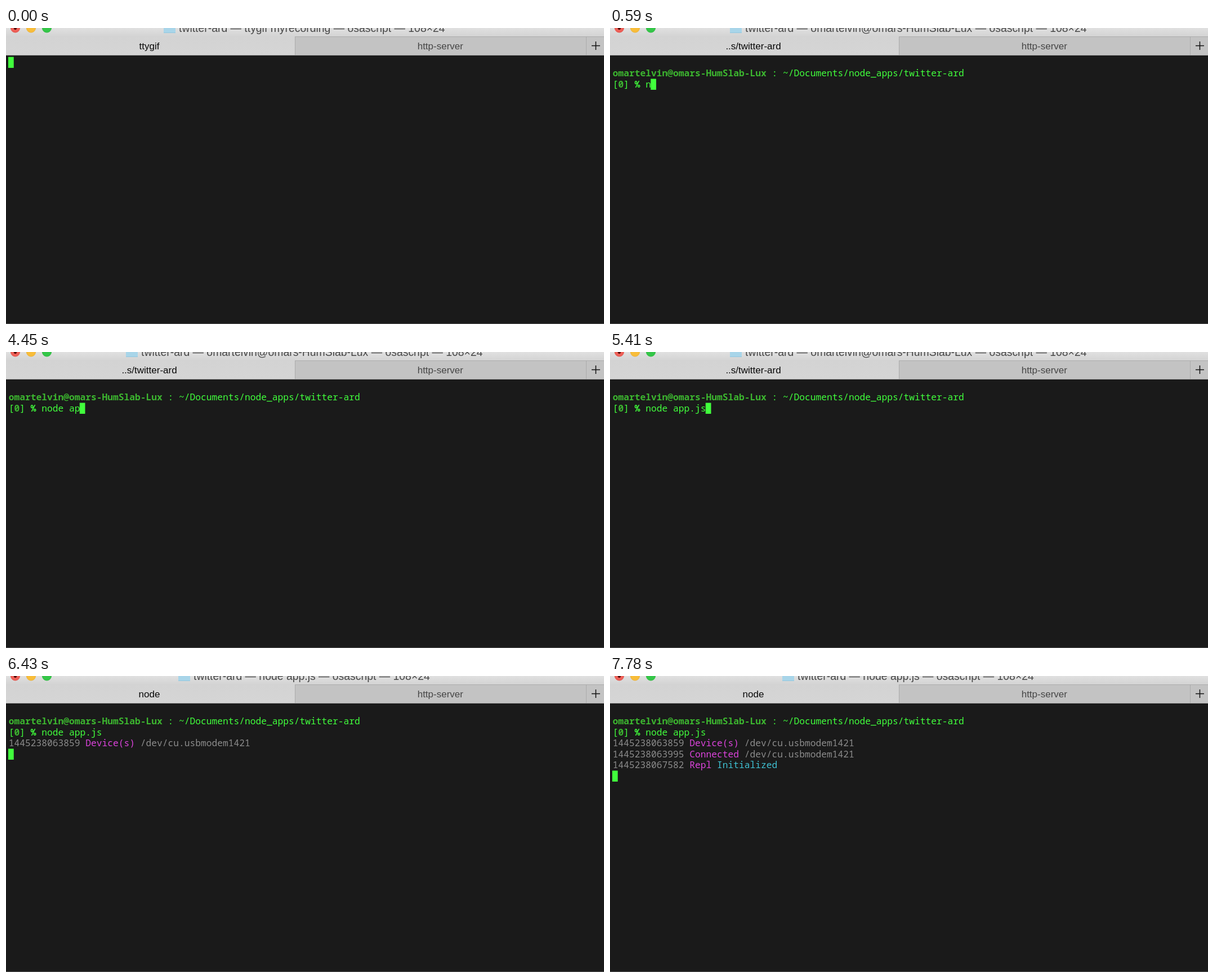
Animation of 1062 by 527 pixels, one loop 8000 ms. Source, as an HTML page with a canvas:

```html
<!DOCTYPE html>
<html lang="en">
<head>
<meta charset="utf-8">
<title>Terminal session</title>
<style>
  html, body { margin: 0; width: 100%; height: 100%; overflow: hidden; background: #1a1a1a; }
  canvas { display: block; }
</style>
</head>
<body>
<canvas id="stage" width="1062" height="527"></canvas>
<script>
const ctx = document.getElementById('stage').getContext('2d');
const LOOP = 8000, CELL = 9.75, ROW = 19.5, LEFT = 4, TOP = 51.5;
const MONO = '16.25px "Noto Sans Mono", monospace';
const SANS = '"Liberation Sans", Arial, sans-serif';
const GREEN = '#41ff3c', DARK = '#3cb52f', GRAY = '#8b8b8b', PINK = '#dc43dc', CYAN = '#3fc0d2';

const host = 'omartelvin@omars-HumSlab-Lux';
const command = 'node app.js';
const keyTimes = [590, 3480, 3710, 3890, 3980, 4070, 4450, 4620, 4760, 5090, 5410];

// A run is [text, colour, bold].
const pathLine = [[host, DARK, true], [' : ~/Documents/node_apps/twitter-ard', GREEN]];
const promptLine = [['[', GREEN], ['0', DARK, true], ['] ', GREEN], ['%', GREEN, true], [' ', GREEN]];
const log = (stamp, label, rest, colour) => [[stamp + ' ', GRAY], [label + ' ', PINK], [rest, colour]];
const port = '/dev/cu.usbmodem1421';

// The last line always carries the cursor.
function screenLines(t) {
  if (t < 270) return [[]];
  if (t < 370) return [[], []];
  if (t < 480) return [[], pathLine, []];
  const typed = command.slice(0, keyTimes.filter(k => k <= t).length);
  const lines = [[], pathLine, [...promptLine, [typed, GREEN]]];
  if (t >= 6330) lines.push(log('1445238063859', 'Device(s)', port, GRAY));
  if (t >= 7650) lines.push(log('1445238063995', 'Connected', port, GRAY));
  if (t >= 7780) lines.push(log('1445238067582', 'Repl', 'Initialized', CYAN));
  if (t >= 6130 && !(t >= 6330 && t < 6430)) lines.push([]);
  return lines;
}

function windowState(t) {
  if (t < 270) return ['ttygif', 'ttygif myrecording'];
  if (t < 6230) return ['..s/twitter-ard', host];
  return ['node', command];
}

function rect(x, y, w, h, colour) {
  ctx.fillStyle = colour;
  ctx.fillRect(x, y, w, h);
}

function text(str, x, y, font, colour, align = 'left') {
  ctx.font = font;
  ctx.fillStyle = colour;
  ctx.textAlign = align;
  ctx.fillText(str, x, y);
}

function disc(x, y, r, fill, edge = fill) {
  ctx.beginPath();
  ctx.arc(x, y, r, 0, Math.PI * 2);
  ctx.fillStyle = fill;
  ctx.fill();
  ctx.strokeStyle = edge;
  ctx.lineWidth = 1;
  ctx.stroke();
}

const barFill = ctx.createLinearGradient(0, 0, 0, 48);
barFill.addColorStop(0, '#e0e0e0');
barFill.addColorStop(0.32, '#d3d3d3');
barFill.addColorStop(1, '#d5d5d5');

function drawWindow([tab, process]) {
  rect(0, 0, 1062, 48, barFill);
  disc(16.5, 0, 8, '#ee5f57', '#e2554d');
  disc(16.5, 0.5, 2.2, '#4d0a08');
  disc(44.5, 0, 8, '#f8bd3a', '#ecb135');
  disc(72.5, 0, 8, '#34c648', '#30ba42');

  // Folder and title are centred together.
  const title = `twitter-ard — ${process} — osascript — 108×24`;
  const font = '19.4px ' + SANS;
  ctx.font = font;
  const x = Math.round(529.5 - (ctx.measureText(title).width + 27) / 2);
  rect(x, 0, 21, 9, '#a8d5e9');
  rect(x, 8, 21, 1, '#94c6dd');
  text(title, x + 27, 7, font, '#484848');

  rect(513, 15, 549, 33, '#c3c3c3');
  rect(513, 15, 549, 1, '#acacac');
  rect(513, 15, 1, 33, '#acacac');
  rect(1030, 15, 1, 33, '#acacac');
  rect(0, 48, 1062, 1, '#9b9b9b');
  text(tab, 254.5, 38, '17px ' + SANS, '#080808', 'center');
  text('http-server', 771.3, 38, '17px ' + SANS, '#464646', 'center');
  rect(1040, 30.8, 15, 1.5, '#111');
  rect(1046.7, 24, 1.5, 15, '#111');
}

function drawScreen(lines) {
  rect(0, 49, 1062, 478, '#1a1a1a');
  rect(0, 526, 1062, 1, '#4c4c4c');
  lines.forEach((runs, row) => {
    const y = TOP + row * ROW;
    let x = LEFT;
    for (const [str, colour, bold] of runs) {
      text(str, x + 0.7, Math.round(y + 15), (bold ? 'bold ' : '500 ') + MONO, colour);
      x += str.length * CELL;
    }
    if (row === lines.length - 1) rect(x, y, CELL, ROW, GREEN);
  });
}

function frame(now) {
  const t = now % LOOP;
  drawScreen(screenLines(t));
  drawWindow(windowState(t));
  requestAnimationFrame(frame);
}
frame(performance.now());
</script>
</body>
</html>
```
